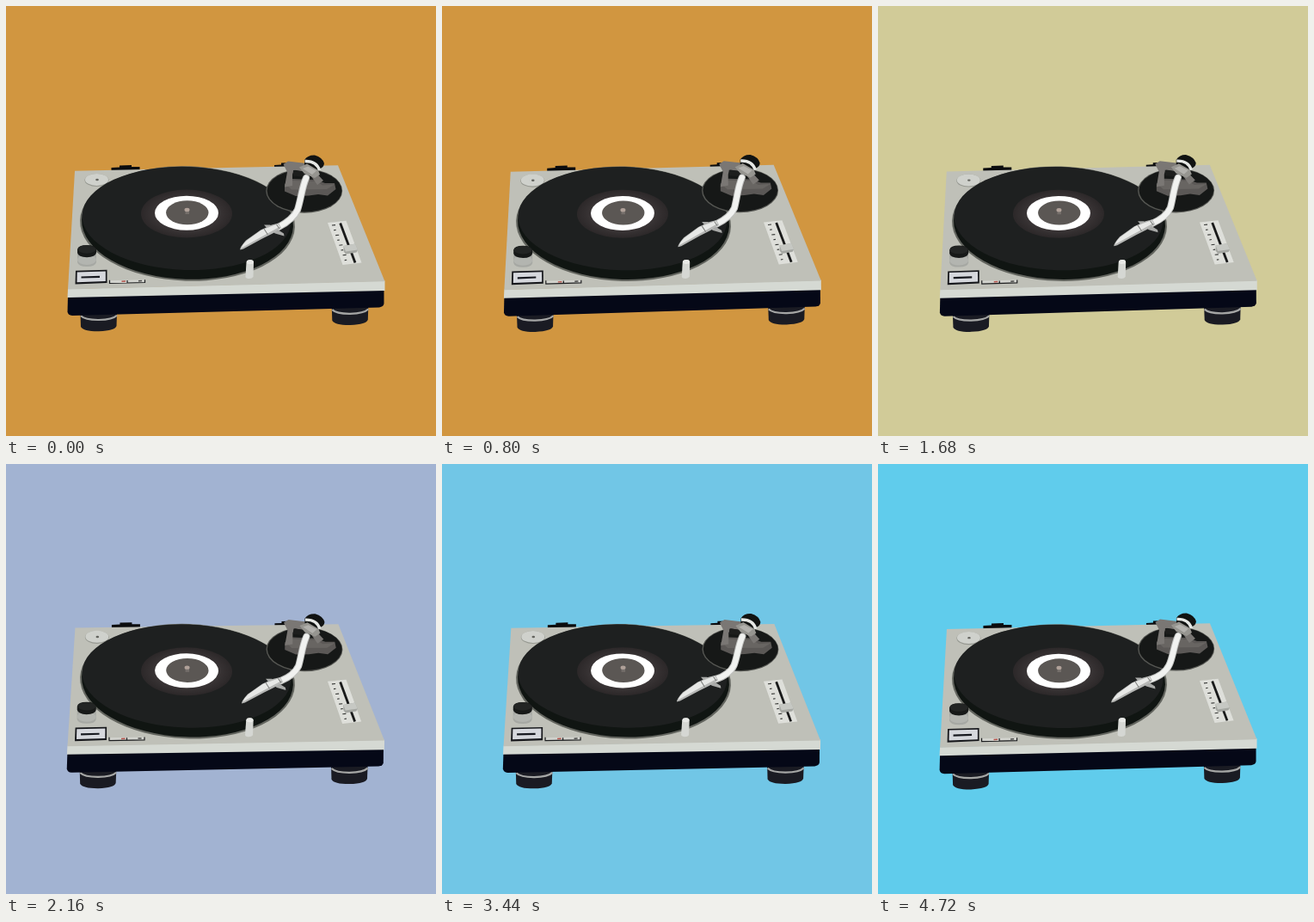
Animation, 500 px wide and 500 px high, one loop 4800 ms. Source, as an HTML page:

```html
<!DOCTYPE html>
<html lang="en">
<head>
<meta charset="utf-8">
<title>Turntable</title>
<style>
  html, body { margin: 0; width: 100%; height: 100%; overflow: hidden; background: #d19640; }
  svg { display: block; width: 100vw; height: 100vh; }
</style>
</head>
<body>
<svg viewBox="0 0 500 500">
  <defs>
    <radialGradient id="groove">
      <stop offset=".7" stop-color="#393435"/>
      <stop offset="1" stop-color="#2c2829"/>
    </radialGradient>
  </defs>
  <rect id="bg" width="500" height="500" fill="#d19640"/>
  <g id="deck">
    <!-- hinges -->
    <g fill="#0b0c0e">
      <path d="M122.500 188L132 187.500V185.500L146 185V187L155.500 187V190.500L122.500 192Z"/>
      <path d="M312 185L320 184.500V182.500L334 182V187L312 188Z"/>
    </g>
    <!-- feet -->
    <g id="foot">
      <path d="M86.500 358L129 356.500L128.500 372Q127 377.500 108 378.300Q90 378.500 87 373Z" fill="#1a1b23"/>
      <path d="M87 360.300Q92 365.200 108 365Q124 364.700 129 359.700" fill="none" stroke="#a5a6a5" stroke-width="2.200"/>
    </g>
    <use href="#foot" x="292.300" y="-7.200"/>
    <!-- body -->
    <path d="M72 337L439.500 329V346Q439 349.700 434 350.400L77 360Q72 359.700 71.500 355.500Z" fill="#050817"/>
    <path d="M72 329L440.500 319.500V331L71.500 339Z" fill="#d5d9d3"/>
    <path d="M80 191.800L386 185.300L440.500 320.300L72 329.500Z" fill="#bfc0b8"/>
    <!-- lamp disc -->
    <ellipse cx="105.500" cy="202.500" rx="14" ry="7.500" fill="#969891"/>
    <ellipse cx="105.500" cy="201.900" rx="13.500" ry="7" fill="#cfd1cc"/>
    <ellipse cx="106" cy="202" rx="1.800" ry="1.200" fill="#63645f"/>
    <!-- platter -->
    <g transform="rotate(1.800 211 253)">
      <ellipse cx="211" cy="253" rx="125" ry="66.700" fill="#63655f"/>
      <ellipse cx="211" cy="252.400" rx="123" ry="65.300" fill="#101512"/>
      <ellipse cx="209.800" cy="247" rx="121.500" ry="60" fill="#1e2020"/>
    </g>
    <ellipse cx="210" cy="241.500" rx="53" ry="28" fill="url(#groove)"/>
    <ellipse cx="210" cy="240.700" rx="37" ry="20" fill="#fff"/>
    <ellipse cx="210.800" cy="240.300" rx="24.700" ry="14" fill="#5b5754"/>
    <path d="M208.500 237V242H213V237Z" fill="#756f6b"/>
    <ellipse cx="210.500" cy="237" rx="3" ry="2.200" fill="#b0a199"/>
    <!-- power knob -->
    <path d="M83 286V298Q84 303 94 303Q104 303 105 298V286Z" fill="#a6a8a3"/>
    <ellipse cx="94" cy="295" rx="11" ry="6" fill="#b3b5b0"/>
    <path d="M83 283Q84 278 94 278Q104 278 105 283V287Q104 292 94 292.300Q84 292 83 287Z" fill="#171918"/>
    <ellipse cx="94" cy="283" rx="10.500" ry="4.700" fill="#232524"/>
    <!-- start button -->
    <path d="M81 307.800L117.500 306.800V322L80.500 323.500Z" fill="#16171b"/>
    <path d="M82.700 309.400L115.800 308.500V320L82.500 321.300Z" fill="#d6d8dd"/>
    <path d="M87.500 315.500L109 314.800" stroke="#17191f" stroke-width="2.200"/>
    <!-- speed buttons -->
    <path d="M120.500 319.200L161.500 318.200V321.200L120.500 322.200Z" fill="#d2d3ce"/>
    <path d="M120.500 318.700V322.500L161.500 321.500V318.200M141 319V322" fill="none" stroke="#1d1e20" stroke-width="1.200"/>
    <path d="M134.500 320.300L139 320.100" stroke="#b5534b" stroke-width="1.500"/>
    <path d="M154 319.800L158 319.600" stroke="#4c4c4b" stroke-width="1.500"/>
    <!-- target light -->
    <path d="M279.500 298Q280 295 284 295Q288 295 288 298L287.500 315Q286 317 283 317Q279 317 278.500 315Z" fill="#d5d7d3"/>
    <ellipse cx="283.800" cy="297.700" rx="4" ry="2.500" fill="#e8e9e6"/>
    <!-- pitch fader -->
    <path d="M374 252L395.500 249.800L413.500 298.500L391.500 301Z" fill="#dedfda"/>
    <path d="M388.700 252.500L406 298.500" stroke="#191a1a" stroke-width="2.800"/>
    <g id="ticks" stroke="#353634" stroke-width="1.100"></g>
    <path d="M392.500 279L406 276.500L409 283.500L407.500 286.500L395 288.500L392.500 285Z" fill="#a5a7a2"/>
    <path d="M392.500 279L406 276.500L409 283.500L395 285.500Z" fill="#c6c8c3"/>
    <!-- arm base -->
    <ellipse cx="346.700" cy="215" rx="44.500" ry="25.700" fill="#555652"/>
    <ellipse cx="347" cy="214.700" rx="43.400" ry="24.700" fill="#161817"/>
    <path d="M324 207L333 201L360 202L371 206L382 206L383.500 213L374 220.500L363 219L352 220.500L337 221L324 215.500Z" fill="#5b5856"/>
    <path d="M325 207L334 203L361 204L368 208.500L382 207.500L373 213L332 213.500Z" fill="#686562"/>
    <path d="M322.500 184L328 180.500L349 183L357 190L369 203L362 208L352 194L335 190.500L333 196V209L324 210.500L327 193Z" fill="#7a7774"/>
    <path d="M334 191L344 192L350 196L345 198.500L333.500 197.500Z" fill="#1d1e1d"/>
    <!-- counterweight -->
    <path d="M347 179Q351 173 359 173.500Q368 176 370 183Q369.500 187.500 365.500 189L361 193L347 185Z" fill="#111312"/>
    <path d="M347.500 180.500Q361 180 364.500 191" fill="none" stroke="#e6e8e5" stroke-width="3.400"/>
    <path d="M341 187.500L350 183.500L363 191L365 196L359 200L347 195Z" fill="#969590"/>
    <path d="M345 189L351 186.500L361 191.500L356 196Z" fill="#b2b1ad"/>
    <!-- tonearm -->
    <g fill="none" stroke-linecap="round">
      <path id="tubeShade" stroke="#bfc0be" stroke-width="8.200"/>
      <path id="tube" stroke="#f1f2f0" stroke-width="6.200"/>
    </g>
    <g id="head">
      <path d="M300 254.500L307 254.500L323 264.500L323.500 267.500L313 264.500L304 259Z" fill="#a9aaa8"/>
      <path d="M272.300 283.500Q271.500 281 279 272.500L296 260.500L309 254.500L317 252.500L320 258L310 264.500L298 270.500L276 282.500Z" fill="#b6b7b5"/>
      <path d="M273.500 281.500Q275 277 280 272.700L297 260.500L316 253.500L318.500 256.500L300 266.700Z" fill="#e7e8e6"/>
      <path d="M300 259L304.500 266M314.500 254L318 259" stroke="#828381" stroke-width="1.100"/>
    </g>
  </g>
</svg>
<script>
const $ = id => document.getElementById(id);
const LOOP = 4800, STEP = 80, FADE = 320;

// time, tilt in degrees, head offset x and y
const poses = [
  [0, 0, 0, 0], [320, -.9, 1, -6], [560, -.5, 2.5, -4], [900, -.2, 2, -3],
  [1280, -.8, 2, -8], [1720, -.2, 2, -4], [2160, .4, 2, -5], [2600, .15, 1, -7],
  [3040, .28, 0, -11], [3480, .35, 1, -7], [3920, .1, 2, -7], [4160, .35, 1, -4],
  [4440, -.85, 1, -8], [4720, -.05, -1, -6], [4800, 0, 0, 0]
];

// time each colour starts to come in
const colours = [
  [0, [209, 150, 64]], [800, [224, 211, 132]],
  [1600, [162, 179, 210]], [3200, [96, 204, 236]]
];

const mix = (a, b, k) => a.map((v, i) => v + (b[i] - v) * k);

function poseAt(t) {
  const i = poses.findIndex(p => p[0] > t);
  const a = poses[i - 1], b = poses[i];
  const k = (t - a[0]) / (b[0] - a[0]);
  return mix(a, b, k * k * (3 - 2 * k)).slice(1);
}

function colourAt(t) {
  let i = colours.length - 1;
  while (colours[i][0] > t) i--;
  if (!i) return colours[0][1];
  const k = Math.min(1, (t - colours[i][0]) / FADE);
  return mix(colours[i - 1][1], colours[i][1], k);
}

function draw(time) {
  const t = Math.floor((time % LOOP) / STEP) * STEP;
  const [tilt, dx, dy] = poseAt(t);
  const bendX = 339 + dx / 2, bendY = 237 + dy / 2;
  const tube = `M349 200C344 211 343 225 ${bendX} ${bendY}Q${bendX - 5} ${bendY + 11} ${317 + dx} ${257 + dy}`;
  $('bg').setAttribute('fill', `rgb(${colourAt(t).map(Math.round)})`);
  $('deck').setAttribute('transform', `rotate(${tilt} 260 250)`);
  $('tubeShade').setAttribute('d', tube);
  $('tube').setAttribute('d', tube);
  $('head').setAttribute('transform', `translate(${dx} ${dy})`);
}

for (let i = 0; i < 8; i++) {
  const x = 379 + i * 2.1, y = 255 + i * 5.8;
  const mark = document.createElementNS('http://www.w3.org/2000/svg', 'path');
  mark.setAttribute('d', `M${x} ${y}l${i % 2 ? 2.5 : 4} -.4`);
  $('ticks').append(mark);
}

const start = performance.now();
function tick() {
  draw(performance.now() - start);
  requestAnimationFrame(tick);
}
tick();
</script>
</body>
</html>
```
